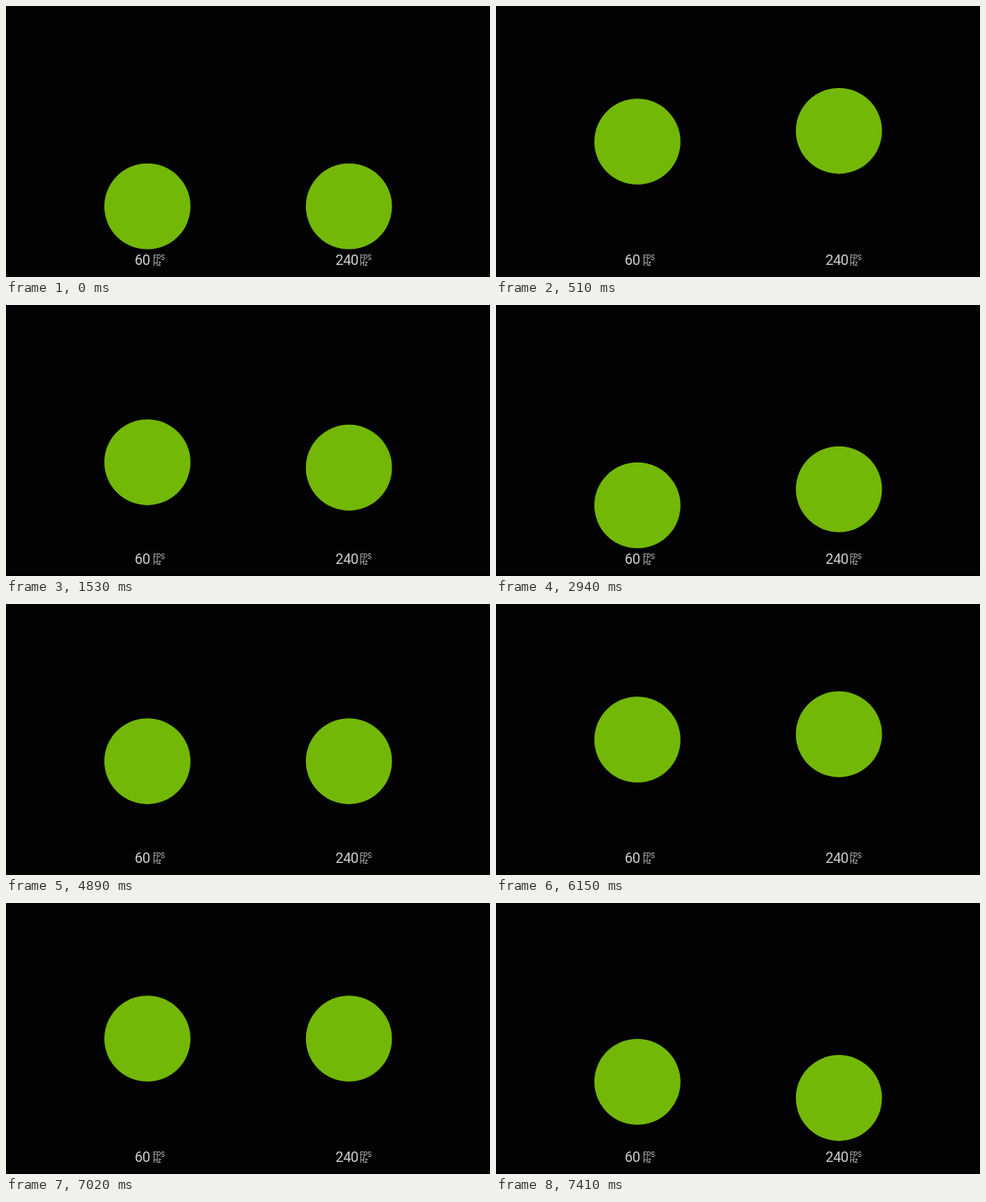
Write an HTML page that moves like this. It is 600 by 337 pixels and loops after 7.44 s.

```html
<!DOCTYPE html>
<html lang="en">
<head>
<meta charset="utf-8">
<title>60 and 240 FPS</title>
<style>
  html, body { margin: 0; width: 100%; height: 100%; overflow: hidden; background: #020202; }
  svg { display: block; width: 600px; height: 337px; }
  circle { fill: #73b806; }
  text { font-family: Roboto, "Liberation Sans", sans-serif; fill: #d0d0d0; }
  .rate { font-size: 17.6px; letter-spacing: -0.4px; }
  .unit { font-size: 8.2px; letter-spacing: -0.1px; }
</style>
</head>
<body>
<svg viewBox="0 0 600 337">
  <rect y="336" width="600" height="1" fill="#000"/>
  <circle id="slow" cx="175.3" cy="249.2" r="53.4"/>
  <circle id="fast" cx="425.1" cy="249.2" r="53.4"/>
  <text class="rate" x="159.6" y="322">60</text>
  <text class="unit" x="182.4" y="316">FPS</text>
  <text class="unit" x="182.4" y="322.6">Hz</text>
  <text class="rate" x="408.4" y="322">240</text>
  <text class="unit" x="438.7" y="316">FPS</text>
  <text class="unit" x="438.7" y="322.6">Hz</text>
</svg>
<script>
const LOOP = 7440, TICK = 30;
const SLOW_START = 1770, SLOW_END = 6060, SLOW_TICK = 390;
const BOTTOM = 249.2, RISE = 161, HALF = 24;

const slow = document.getElementById("slow");
const fast = document.getElementById("fast");

// Four steps per five ticks at full speed.
const fullSpeed = tick => Math.ceil(tick * 4 / 5);

function stepAt(t) {
  if (t < SLOW_START) return fullSpeed(Math.floor(t / TICK));
  if (t < SLOW_END) return 2 * HALF + Math.floor((t - SLOW_START) / SLOW_TICK);
  return 2 * HALF + fullSpeed(Math.floor((t - SLOW_END) / TICK) + 13);
}

function height(step) {
  const phase = step % (2 * HALF);
  return BOTTOM - RISE * (HALF - Math.abs(HALF - phase)) / HALF;
}

const start = performance.now();

function draw(now) {
  const step = stepAt(Math.max(0, now - start) % LOOP);
  fast.setAttribute("cy", height(step));
  slow.setAttribute("cy", height(step - step % 4));
  requestAnimationFrame(draw);
}
draw(start);
</script>
</body>
</html>
```
